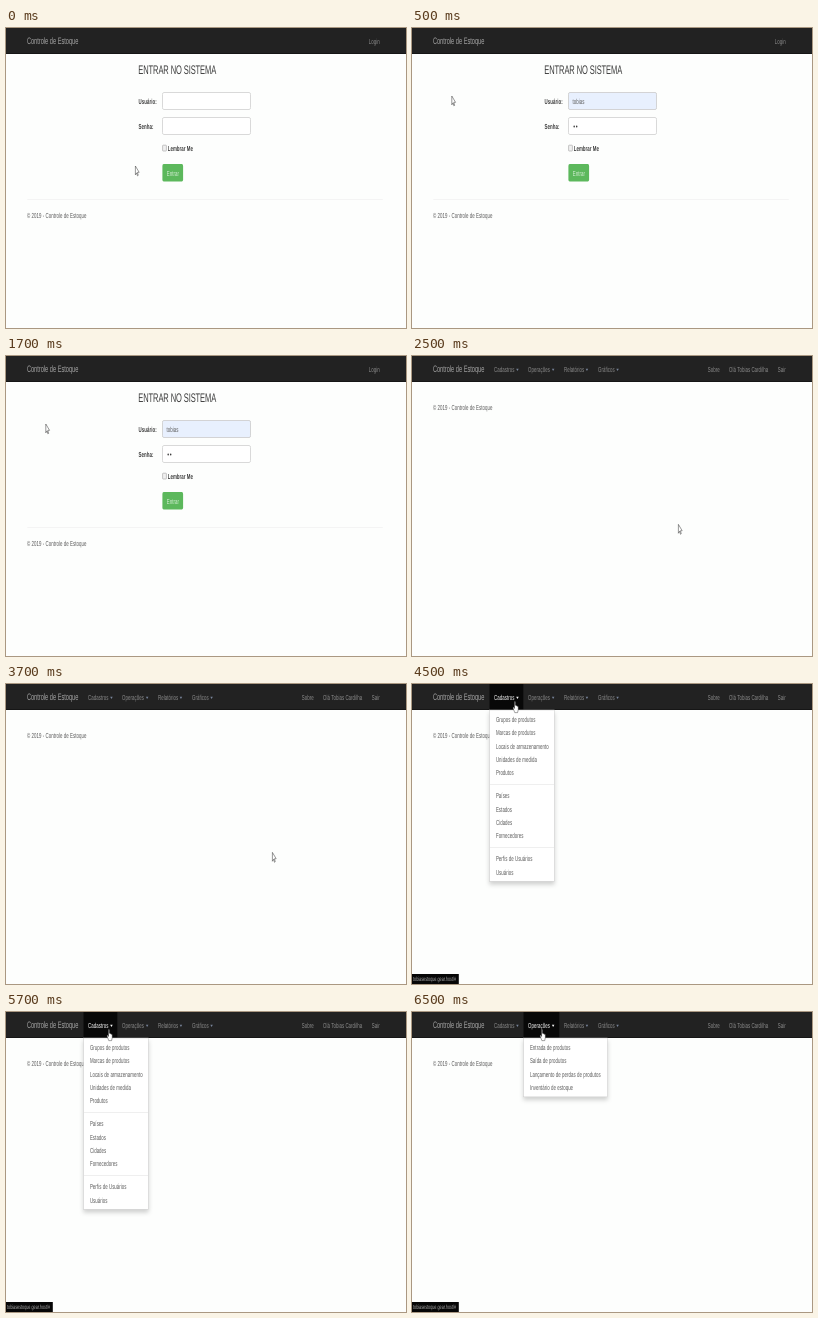
These frames come from a looping animation (400 px wide and 300 px high, 8 s). An HTML page:

```html
<!DOCTYPE html>
<html lang="pt-BR">
<head>
<meta charset="utf-8">
<title>Controle de Estoque</title>
<style>
  html, body { margin: 0; width: 100%; height: 100%; overflow: hidden; background: #fdfefd; }
  svg { display: block; width: 100%; height: 100%; }
  text { font-family: "Liberation Sans", Arial, sans-serif; text-rendering: geometricPrecision; white-space: pre; }
  .body { letter-spacing: 0.15px; }
  .title { letter-spacing: -0.3px; }
</style>
</head>
<body>
<svg id="stage" viewBox="0 0 400 300"></svg>
<script>
// Page pixels are shown at this scale; text follows it too.
const SX = 0.3135, SY = 0.52;
const NS = 'http://www.w3.org/2000/svg';
const GREY = '#8c8c8c', DARK = '#5a5a5a', STRONG = '#3c3c3c';
const stage = document.getElementById('stage');

function add(parent, tag, attrs) {
  const el = document.createElementNS(NS, tag);
  for (const k in attrs) el.setAttribute(k, attrs[k]);
  parent.appendChild(el);
  return el;
}
const group = () => add(stage, 'g', {});
const place = (x, y) => `translate(${x} ${y}) scale(${SX} ${SY})`;

function rect(g, x, y, width, height, fill, more) {
  return add(g, 'rect', { x, y, width, height, fill, ...more });
}
function text(g, str, x, y, size = 14, fill = DARK, weight = 400) {
  const el = add(g, 'text', {
    transform: place(x, y), 'font-size': size, 'font-weight': weight, fill,
    class: size === 14 ? 'body' : size === 24 ? 'title' : ''
  });
  el.textContent = str;
  return el;
}
function path(g, d, x, y, more) {
  return add(g, 'path', { d, transform: place(x, y), ...more });
}
function field(g, y, fill = '#fff') {
  rect(g, 156.5, y, 88, 17, fill, { stroke: '#d0d0d0', 'stroke-width': 0.8, rx: 1.3, ry: 2 });
}
function navItem(g, label, x, caretX, fill = GREY) {
  text(g, label, x, 15.6, 14, fill);
  if (caretX) path(g, 'M0 0H8L4 4Z', caretX, 12.8, { fill: fill === GREY ? '#78849a' : fill });
}

// Navigation bar
const bar = group();
rect(bar, 0, 0, 400, 26, '#222');
rect(bar, 0, 25, 400, 1, '#161616');
text(bar, 'Controle de Estoque', 20.9, 15.8, 18, '#a5a5a5');

// Login page
const login = group();
text(login, 'Login', 362.8, 15.6, 14, GREY);
text(login, 'ENTRAR NO SISTEMA', 132.3, 46.2, 24, STRONG);
text(login, 'Usuário:', 132.6, 75.6, 14, STRONG, 700);
text(login, 'Senha:', 132.6, 101, 14, STRONG, 700);
field(login, 64.5);
field(login, 89.5);
rect(login, 156.6, 117.2, 3.8, 5.8, '#f0f0f0', { stroke: '#a0a0a0', 'stroke-width': 0.6, rx: 0.6 });
text(login, 'Lembrar Me', 161.7, 123.3, 14, STRONG, 700);
rect(login, 156.4, 136, 20.7, 17.6, '#5cb85c', { rx: 1.3, ry: 2 });
text(login, 'Entrar', 160.7, 147.6, 14, '#d8eed8');
rect(login, 21.3, 171, 355.5, 0.6, '#eee');

const filled = group();
field(filled, 64.5, '#e8f0fe');
text(filled, 'tobias', 160.6, 75.8, 14, DARK);
for (const x of [162.2, 164.7]) add(filled, 'ellipse', { cx: x, cy: 98.6, rx: 0.75, ry: 1, fill: STRONG });

// Signed-in page
const MENUS = [
  { label: 'Cadastros', x: 82, caret: 104.2, left: 77.5, tab: 33.8, width: 64.6,
    groups: [
      ['Grupos de produtos', 'Marcas de produtos', 'Locais de armazenamento', 'Unidades de medida', 'Produtos'],
      ['Países', 'Estados', 'Cidades', 'Fornecedores'],
      ['Perfis de Usuários', 'Usuários']
    ] },
  { label: 'Operações', x: 116, caret: 139.9, left: 111.5, tab: 35.8, width: 83.8,
    groups: [['Entrada de produtos', 'Saída de produtos', 'Lançamento de perdas de produtos', 'Inventário de estoque']] },
  { label: 'Relatórios', x: 152, caret: 173.7 },
  { label: 'Gráficos', x: 186, caret: 204.3 }
];

const home = group();
for (const m of MENUS) navItem(home, m.label, m.x, m.caret);
navItem(home, 'Sobre', 295.8);
navItem(home, 'Olá Tobias Cardilha', 317);
navItem(home, 'Sair', 365.7);

const footer = text(stage, '© 2019 - Controle de Estoque', 21, 190.2);

function dropdown(m) {
  const g = group(), step = 13.37, gap = 9.4;
  rect(g, m.left, 0, m.tab, 26, '#080808');
  navItem(g, m.label, m.x, m.caret, '#fff');
  const items = m.groups.flat().length;
  const height = items * step + (m.groups.length - 1) * gap + 5.4;
  const panel = rect(g, m.left + 0.2, 26, m.width, height, '#fff', { stroke: '#ccc', 'stroke-width': 0.5 });
  panel.style.filter = 'drop-shadow(0 3px 2px rgba(0,0,0,.18))';
  let y = 38;
  m.groups.forEach((list, i) => {
    if (i) {
      rect(g, m.left + 0.5, y - 4.6, m.width - 0.6, 0.6, '#e5e5e5');
      y += gap;
    }
    for (const item of list) {
      text(g, item, m.left + 6.4, y);
      y += step;
    }
  });
  return g;
}
const registers = dropdown(MENUS[0]);
const operations = dropdown(MENUS[1]);

const status = group();
rect(status, 0, 290, 46.8, 10, '#060606');
text(status, 'tobiasestoque.gear.host/#', 1, 297.3, 12, '#a8a8a8');

// Pointers
const arrow = path(stage, 'M0 0V17L4 13.2L6.6 19L9 18L6.5 12.2H12Z', 0, 0,
  { fill: '#fff', stroke: '#333', 'stroke-width': 1.2 });
const hand = path(stage,
  'M5 1Q7 -1 8 2V8Q10 6 11 9Q13 7 14 10Q17 8 17 12V16L15 22H6L1 14Q-1 11 2 11L5 14Z', 0, 0,
  { fill: '#fff', stroke: '#222', 'stroke-width': 1 });

const SCENES = [
  { from: 0, show: [login], pointer: arrow, at: [129.4, 138] },
  { from: 500, show: [login, filled], pointer: arrow, at: [39.8, 68] },
  { from: 2500, show: [home], pointer: arrow, at: [266.4, 168.4] },
  { from: 4500, show: [home, registers, status], pointer: hand, at: [100.9, 17.2] },
  { from: 6500, show: [home, operations, status], pointer: hand, at: [128, 17.2] }
];
const LOOP = 8000;
const parts = [login, filled, home, registers, operations, status, arrow, hand];
let current;

function draw(now) {
  const t = now % LOOP;
  const scene = SCENES.findLast(s => t >= s.from);
  if (scene === current) return;
  current = scene;
  for (const p of parts) {
    p.style.display = scene.show.includes(p) || p === scene.pointer ? '' : 'none';
  }
  scene.pointer.setAttribute('transform', place(...scene.at));
  footer.setAttribute('transform', place(21, scene.show.includes(login) ? 190.2 : 54.4));
}
const start = performance.now();
function tick() {
  draw(performance.now() - start);
  requestAnimationFrame(tick);
}
tick();
</script>
</body>
</html>
```
